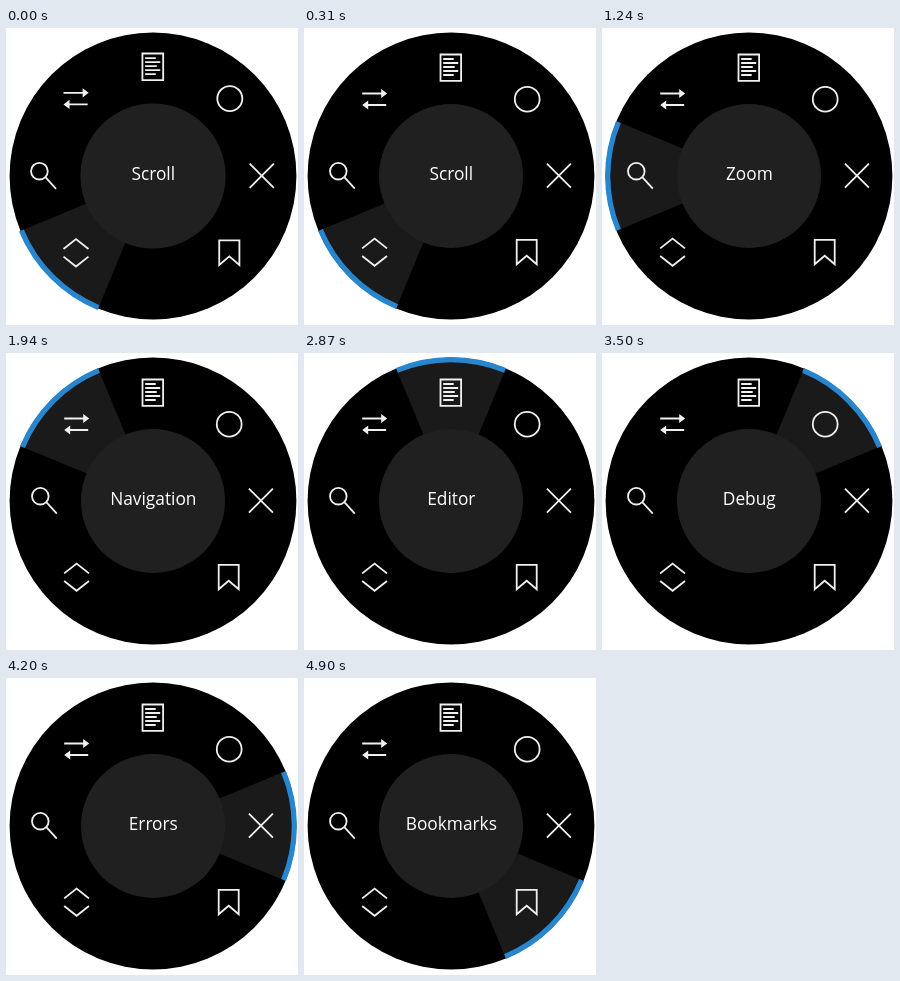
An HTML page for the animation above (6310 ms loop, 292 by 297 pixels).

```html
<!DOCTYPE html>
<html lang="en">
<head>
<meta charset="utf-8">
<title>Radial menu</title>
<style>
  html, body { margin: 0; width: 100%; height: 100%; overflow: hidden; background: #fff; }
  svg { display: block; width: 292px; height: 297px; }
  .icon { fill: none; stroke: #f0f0f0; stroke-width: 1.8; }
  .solid { fill: #f0f0f0; stroke: none; }
  text { font: 500 17.3px "Open Sans", "Noto Sans", sans-serif; fill: #fff; text-anchor: middle; }
</style>
</head>
<body>
<svg viewBox="0 0 292 297">
  <g transform="translate(147 148)">
    <circle r="143.4"/>
    <g id="menu">
      <g id="wedge">
        <path id="sector" fill="#1a1a1a"/>
        <path id="rim" fill="none" stroke="#2886cf" stroke-width="5.2"/>
      </g>
      <circle r="72" fill="#202020"/>
      <g id="icons"></g>
    </g>
    <text id="label" x=".3" y="4"></text>
  </g>
</svg>
<script>
const LOOP = 6310;
const $ = id => document.getElementById(id);

// Start time, label, direction in degrees clockwise from the top, icon around (0,0)
const items = [
  [0, 'Scroll', 225, '<path d="M-12-3.8L.4-13.6L12.8-3.8M-12 3.8L.4 13.6L12.8 3.8"/>'],
  [1240, 'Zoom', 270, '<circle cx="-4.2" cy="-4.5" r="8.3"/><path d="M1.8 1.5L12.3 13"/>'],
  [1940, 'Navigation', 315,
    '<path d="M-12-5.7H8M12 5.8H-8"/><path class="solid" d="M7-10.3L13-5.7L7-1.1ZM-6 1.2L-12 5.8L-6 10.4Z"/>'],
  [2870, 'Editor', 0,
    '<path d="M-10.2-13H10.4V13.4H-10.2ZM-7.5-8.5H3M-7.5-4.5H7.5M-7.5-.5H4M-7.5 3.5H7.5M-7.5 7.5H3"/>'],
  [3500, 'Debug', 45, '<circle r="12.4"/>'],
  [4200, 'Errors', 90, '<path d="M-12-12L12 12M12-12L-12 12"/>'],
  [4900, 'Bookmarks', 135, '<path d="M-10.5-12.3H9.5V12L-.5 3.5L-10.5 12Z"/>']
];

const half = Math.PI / 8;
const arc = r => {
  const x = r * Math.sin(half), y = -r * Math.cos(half);
  return `${-x} ${y}A${r} ${r} 0 0 1 ${x} ${y}`;
};
const placeIcon = ([, , angle, shape]) => {
  const a = angle * Math.PI / 180;
  const x = 108.2 * Math.sin(a) - 0.3, y = -108.2 * Math.cos(a) - 0.3;
  return `<g class="icon" transform="translate(${x} ${y})">${shape}</g>`;
};
$('sector').setAttribute('d', `M0 0L${arc(143)}Z`);
$('rim').setAttribute('d', `M${arc(141.3)}`);
$('icons').innerHTML = items.map(placeIcon).join('');

function draw(t) {
  const [, name, angle] = items.findLast(item => item[0] <= t);
  $('label').textContent = name;
  $('wedge').setAttribute('transform', `rotate(${angle})`);

  // The menu settles to its final size in four small steps
  const step = Math.max(0, Math.min(4, Math.floor((t - 80) / 76.6) + 1));
  $('menu').setAttribute('transform', `scale(${1.008 - step * 0.002})`);
}

function frame() {
  draw(performance.now() % LOOP);
  requestAnimationFrame(frame);
}
frame();
</script>
</body>
</html>
```
